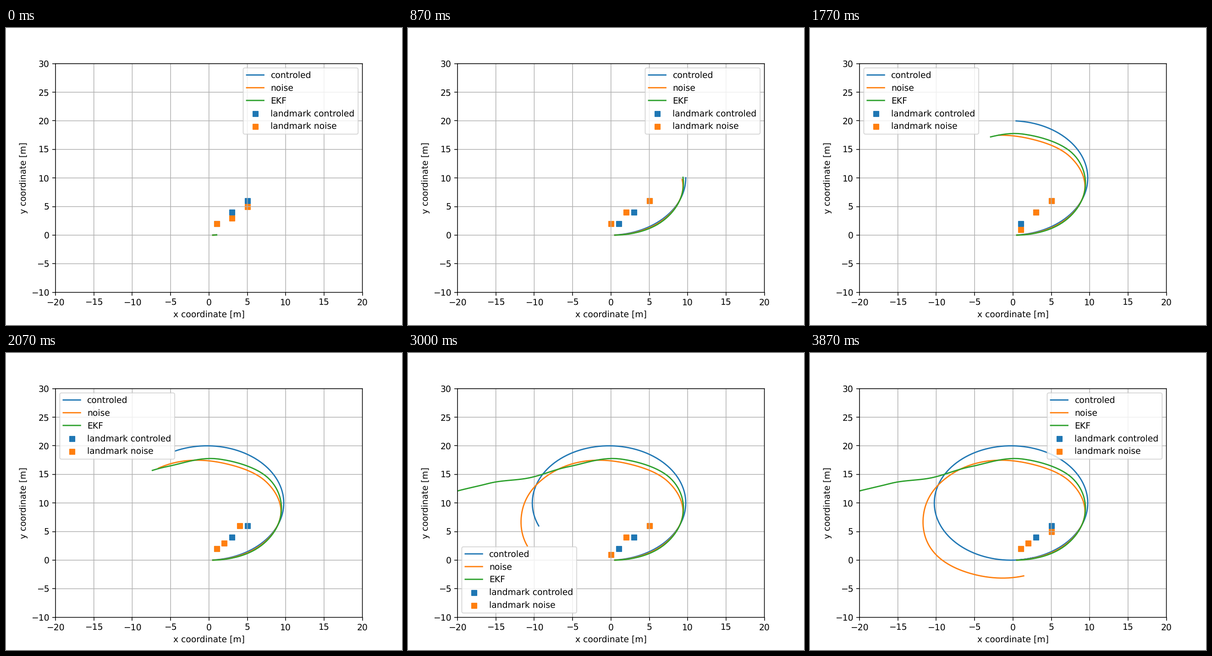
Write a matplotlib script that moves like this. It is 864 px wide and 648 px high and loops after 3900 ms.

```python
import numpy as np
import matplotlib.pyplot as plt
from matplotlib.animation import FuncAnimation

FRAMES, INTERVAL = 130, 30
KEY_GAP = 13  # steps between key points
STEPS = np.arange(1, FRAMES + 2)

# Key points in metres, one every KEY_GAP steps.
NOISE_KEYS = [(0.5, 0), (6.4, 2.3), (9.35, 7.85), (7.5, 13.65), (2.1, 16.9),
              (-4.3, 17.1), (-9.55, 13.4), (-11.7, 7.4), (-10.2, 1.2),
              (-5.05, -2.5), (1.4, -2.75)]
EKF_KEYS = [(0.5, 0), (6.45, 2.2), (9.4, 8.05), (7.65, 14.45), (1.2, 17.7),
            (-5.35, 16.4), (-10.3, 14.5), (-16, 13.4), (-21.7, 11.4),
            (-27, 9), (-33, 7)]
LANDMARKS = np.array([(1, 2), (3, 4), (5, 6)])

plt.rcParams.update({"path.snap": False, "text.hinting": "none"})


def controlled_path():
    """Constant speed 5 m/s and turn rate 0.5 rad/s, sampled every 0.1 s."""
    heading = 0.05 * STEPS
    return np.column_stack([np.cumsum(0.5 * np.cos(heading)),
                            np.cumsum(0.5 * np.sin(heading))])


def spline(keys):
    """Catmull-Rom curve through evenly timed keys, one value per step."""
    pad = np.vstack([2 * keys[0] - keys[1], keys, 2 * keys[-1] - keys[-2]])
    u = (STEPS - 1) / KEY_GAP
    i = np.minimum(u.astype(int), len(keys) - 2)
    t = (u - i)[:, None]
    p0, p1, p2, p3 = (pad[i + j] for j in range(4))
    return 0.5 * (2 * p1 + (p2 - p0) * t
                  + (2 * p0 - 5 * p1 + 4 * p2 - p3) * t**2
                  + (3 * p1 - p0 - 3 * p2 + p3) * t**3)


def drifted(path, keys):
    """The given path plus a smooth drift that leads it through the keys."""
    return path + spline(np.array(keys) - path[::KEY_GAP])


def noisy_landmarks():
    """Truncated noise: each coordinate stays or falls by one."""
    rng = np.random.default_rng(4)
    return LANDMARKS - (rng.random((FRAMES, 3, 2)) < 0.4)


controlled = controlled_path()
paths = [controlled, drifted(controlled, NOISE_KEYS),
         drifted(controlled, EKF_KEYS)]
marks = noisy_landmarks()

fig, ax = plt.subplots(figsize=(6.4, 4.8), dpi=135)
lines = [ax.plot([], [], label=name)[0]
         for name in ("controled", "noise", "EKF")]
square = dict(marker="s", linewidths=1)
ax.scatter(*LANDMARKS.T, color="C0", label="landmark controled", **square)
noise_marks = ax.scatter(*marks[0].T, color="C1", label="landmark noise",
                         **square)
ax.set(xlim=(-20, 20), ylim=(-10, 30),
       xticks=range(-20, 21, 5), yticks=range(-10, 31, 5),
       xlabel="x coordinate [m]", ylabel="y coordinate [m]")
ax.grid(True)
ax.legend(loc="best")  # moves to the emptiest corner as the paths grow


def update(i):
    for line, path in zip(lines, paths):
        line.set_data(*path[:i + 2].T)
    noise_marks.set_offsets(marks[i])
    return [*lines, noise_marks]


anim = FuncAnimation(fig, update, frames=FRAMES, interval=INTERVAL,
                     repeat=True, repeat_delay=0, cache_frame_data=False)
plt.show()
```
